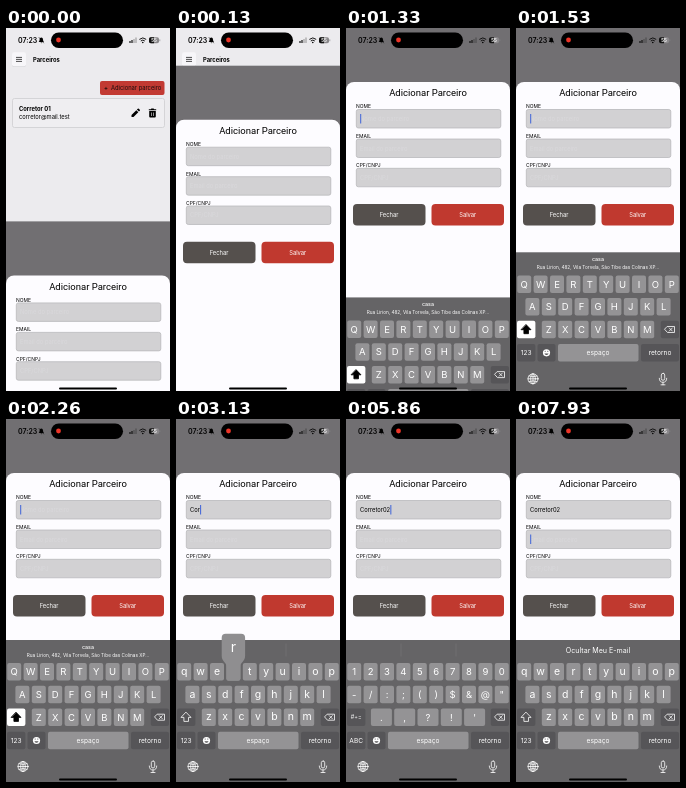
Write an HTML page that moves like this. It is 164 px wide and 363 px high and loops after 8000 ms.

```html
<!DOCTYPE html>
<html lang="pt-BR">
<head>
<meta charset="utf-8">
<title>Adicionar Parceiro</title>
<style>
  html, body { margin: 0; width: 100%; height: 100%; overflow: hidden; background: #ecebee; }
  svg { display: block; width: 100vw; height: 100vh; }
  text { font-family: Inter, Roboto, sans-serif; font-size: 5.8px; white-space: pre; }
  .mid { text-anchor: middle; }
  .bold { font-weight: 700; }
  .title { font-family: Roboto, sans-serif; font-size: 9.5px; }
  .label { font-size: 5px; }
  .hint { fill: #d9d8db; }
  .input { fill: #d2d1d3; stroke: #b4b3b6; stroke-width: .7; }
  .key { fill: #949395; }
  .dark { fill: #565558; }
  .line { fill: none; stroke: #fff; stroke-width: .8; stroke-linejoin: round; stroke-linecap: round; }
  #keyboard text { fill: #fff; }
</style>
</head>
<body>
<svg viewBox="0 0 164 363">
  <!-- partner list -->
  <rect width="164" height="363" fill="#ecebee"/>
  <rect x="6" y="25" width="14" height="14" rx="2" fill="#d9d8db"/>
  <rect x="6" y="24.3" width="14" height="14" rx="2" fill="#f7f6f9"/>
  <path d="M10 29.4h6M10 31.4h6M10 33.4h6" stroke="#222" stroke-width=".8"/>
  <text class="bold" x="27" y="33.6">Parceiros</text>
  <rect x="94" y="53" width="64.5" height="14" rx="2" fill="#c23a33"/>
  <text class="bold" x="98" y="62" fill="#1c0e0d">+</text>
  <text x="105" y="62" fill="#1c0e0d">Adicionar parceiro</text>
  <rect x="6.5" y="70.5" width="152" height="29" rx="2" fill="#efeef1" stroke="#cfced1" stroke-width=".8"/>
  <text class="bold" x="13" y="83.3">Corretor 01</text>
  <text x="13" y="91">corretor@mail.test</text>
  <path d="M125.5 89v-2l4.8-4.8 2 2-4.8 4.800zM130.900 81.600l.9-.9q.5-.5 1 0l1 1q.5.5 0 1l-.9.9z"/>
  <path d="M142.800 82.300v-1h2l.6-.7h2.200l.6.7h2v1zM143.200 83h6.600v5.500q0 1-1 1h-4.600q-1 0-1-1z"/>
  <path d="M145.500 84.500v3.500M147.500 84.500v3.500" stroke="#efeef1" stroke-width=".6"/>

  <!-- modal -->
  <g id="modal">
    <rect width="164" height="400" fill="#716f72"/>
    <rect y="54" width="164" height="360" rx="8" fill="#fdfcff"/>
    <text class="mid title" x="82" y="68.3">Adicionar Parceiro</text>
    <g id="fields"></g>
    <rect x="7" y="176" width="72.5" height="21.5" rx="4" fill="#55504d"/>
    <text class="mid" x="43" y="189" fill="#fff">Fechar</text>
    <rect x="85.5" y="176" width="72.5" height="21.5" rx="4" fill="#c0392f"/>
    <text class="mid" x="121.7" y="189" fill="#fff">Salvar</text>
    <text id="typed" x="14" y="93"></text>
    <rect id="caret" width="1" height="9.5" fill="#3f63d8"/>
  </g>

  <!-- status bar -->
  <text x="12" y="14.9" style="font-size:7px;font-weight:600">07:23</text>
  <path d="M32.6 14q1-.8 1-2.5 0-2 1.7-2t1.7 2q0 1.700 1 2.500zM34.500 14.600h1.700q-.8 1.200-1.700 0"/>
  <path d="M32.8 9.2l5 6" stroke="#000" stroke-width=".6"/>
  <rect x="45" y="4.5" width="72" height="15.5" rx="7.75"/>
  <circle cx="52.5" cy="12" r="2.4" fill="#ee3528"/>
  <path d="M124 15v-2M126 15v-3" stroke="#111" stroke-width="1.2"/>
  <path d="M128 15v-4M130 15v-5.5" stroke="#111" stroke-opacity=".35" stroke-width="1.2"/>
  <path d="M133.4 11.4q3.4-3 6.8 0M134.8 13q2-1.8 4 0" fill="none" stroke="#111"/>
  <circle cx="136.8" cy="14.5" r=".8"/>
  <rect x="143" y="9.3" width="10" height="6" rx="1.8" fill="#8a888b"/>
  <path d="M148 9.300h-3.200q-1.800 0-1.800 1.800v2.400q0 1.800 1.800 1.800h3.200z" fill="#111"/>
  <text class="mid bold" x="148" y="14" fill="#fff" style="font-size:4.6px">55</text>
  <path d="M153.8 11.4v1.8" stroke="#8a888b" stroke-width=".7"/>

  <!-- keyboard -->
  <g id="keyboard">
    <rect y="221" width="164" height="145" fill="#656466"/>
    <g id="address">
      <text class="mid" x="82" y="230" style="font-size:5.3px;font-weight:500">casa</text>
      <text class="mid" x="82" y="237.6" style="font-size:4.7px">Rua Lirion, 482, Vila Torvela, São Tibe das Colinas XP...</text>
    </g>
    <path id="dividers" d="M55 224.500v13M110 224.500v13" stroke="#77767a" stroke-width=".6"/>
    <text id="hideMail" class="mid" x="82" y="234.3" style="font-size:7.1px">Ocultar Meu E-mail</text>
    <g id="layouts"></g>
    <rect class="dark" x="21.5" y="312.7" width="18" height="17.5" rx="2"/>
    <circle cx="30.5" cy="321.5" r="3.6" fill="#fff"/>
    <path d="M28.4 322.2q2.100 3 4.200 0z" fill="#565558"/>
    <path d="M29.2 319.500v1.200M31.800 319.500v1.200" stroke="#565558" stroke-width=".8"/>
    <rect class="key" x="42" y="312.7" width="80.5" height="17.5" rx="2"/>
    <text class="mid" x="82" y="323.5" style="font-size:6.6px">espaço</text>
    <rect class="dark" x="125" y="312.7" width="38" height="17.5" rx="2"/>
    <text class="mid" x="144" y="323.5" style="font-size:6.6px">retorno</text>
    <rect class="dark" x="144.8" y="289.5" width="18.2" height="17.5" rx="2"/>
    <path class="line" d="M151.500 295.200h7v6h-7l-2.700-3zM153.300 296.700l3 3M156.300 296.700l-3 3"/>
    <g class="line">
      <circle cx="17" cy="347.5" r="5"/>
      <ellipse cx="17" cy="347.5" rx="2.3" ry="5"/>
      <path d="M12 347.500h10M17 342.500v10M13 344.700q4 1.600 8 0M13 350.300q4-1.600 8 0"/>
      <rect x="145.3" y="342" width="3.4" height="7" rx="1.7"/>
      <path d="M143.300 347q0 4 3.700 4t3.700-4M147 351v2.500M145 353.500h4"/>
    </g>
    <g id="popup">
      <path fill="#8f8e90"/>
      <text class="mid" y="-20" style="font-size:14px"></text>
    </g>
  </g>
  <rect x="53" y="359.5" width="58" height="2" rx="1"/>
</svg>
<script>
const $ = id => document.getElementById(id);
const show = (id, visible) => $(id).style.display = visible ? '' : 'none';

const LOOP = 8000, FPS = 15;
const FOCUS_NAME = 1000, KEYBOARD_IN = 1200, LOWERCASE = 2800, DIGITS = 4900;
const FOCUS_EMAIL = 6400, MAIL_TIP = 6730, EMAIL_LOWERCASE = 7660, POPUP_TIME = 120;
const STROKES = [
  [2600, 'C'], [2930, 'o'], [3100, 'r'], [3330, 'r'], [3500, 'e'],
  [3700, 't'], [3850, 'o'], [4000, 'r'], [5400, '0'], [5600, '2']
];
const PITCH = 16.4, ROW_Y = [252.8, 275.5, 298.2], BOTTOM_ROW_Y = 321.4;
const LETTERS = ['qwertyuiop', 'asdfghjkl', 'zxcvbnm'];
const LAYOUTS = {
  upper: LETTERS.map(row => row.toUpperCase()),
  lower: LETTERS,
  digits: ['1234567890', '-/:;()$&@"', ".,?!'"]
};
const keyPlaces = {};

$('fields').innerHTML = [
  ['NOME', 'Nome do parceiro', 81.5],
  ['EMAIL', 'Email do parceiro', 111],
  ['CPF/CNPJ', 'CPF/CNPJ', 140.3]
].map(([label, hint, y], i) => `
  <text class="label" x="10" y="${y - 1.1}">${label}</text>
  <rect class="input" x="10.3" y="${y}" width="144.5" height="18.5" rx="2"/>
  <text class="hint" id="hint${i}" x="14" y="${y + 11.5}">${hint}</text>`).join('');

function keyMarkup(x, y, width, label, size, dark) {
  const isLower = /^[a-z]$/.test(label);
  return `<rect class="${dark ? 'dark' : 'key'}" x="${x - width / 2}" y="${y - 8.7}" width="${width}" height="17.5" rx="2"/>
    <text class="mid" x="${x}" y="${y + size * (isLower ? .3 : .36)}" style="font-size:${size}px">${label}</text>`;
}

function layoutMarkup(name) {
  const isDigits = name === 'digits';
  const size = name === 'lower' ? 10.5 : 9.5;
  let out = '';
  LAYOUTS[name].forEach((row, r) => {
    const wide = isDigits && r === 2;
    const pitch = wide ? 23.3 : PITCH;
    [...row].forEach((char, i) => {
      const x = 82 + (i - (row.length - 1) / 2) * pitch;
      keyPlaces[char] = [x, ROW_Y[r]];
      out += keyMarkup(x, ROW_Y[r], wide ? 21 : 14, char, size);
    });
  });
  out += keyMarkup(10.2, BOTTOM_ROW_Y, 18.4, isDigits ? 'ABC' : '123', 6.6, true);
  if (isDigits) {
    out += keyMarkup(10.2, ROW_Y[2], 18.4, '#+=', 5.5, true);
  } else {
    const on = name === 'upper';
    out += `<rect x="1" y="289.5" width="18.4" height="17.5" rx="2" fill="${on ? '#fff' : '#565558'}"/>
      <path class="line" d="M10.2 293.4l4.8 5h-2.5v4h-4.6v-4h-2.5z" ${on ? 'style="fill:#000;stroke:#000"' : ''}/>`;
  }
  return `<g id="${name}">${out}</g>`;
}
$('layouts').innerHTML = Object.keys(LAYOUTS).map(layoutMarkup).join('');

// Remaining share of the way for a critically damped spring.
function spring(ms) {
  const x = Math.max(0, ms) * .017;
  return (1 + x) * Math.exp(-x);
}

function drawPopup(char) {
  show('popup', char);
  if (!char) return;
  const [x, y] = keyPlaces[char];
  const shift = Math.max(13, Math.min(151, x)) - x;
  const left = shift - 11.7, right = shift + 11.7;
  const [shape, letter] = $('popup').children;
  $('popup').setAttribute('transform', `translate(${x} ${y})`);
  shape.setAttribute('d', `M-7 7V-5C-7-10 ${left}-10 ${left}-16V-34q0-4 4-4H${right - 4}q4 0 4 4V-16C${right}-10 7-10 7-5V7q0 2-2 2H-5q-2 0-2-2z`);
  letter.setAttribute('x', shift);
  letter.textContent = char;
}

function layoutAt(t) {
  if (t < LOWERCASE) return 'upper';
  if (t < DIGITS) return 'lower';
  if (t < FOCUS_EMAIL) return 'digits';
  return t < EMAIL_LOWERCASE ? 'upper' : 'lower';
}

function draw(t) {
  const pressed = STROKES.filter(([at]) => at <= t);
  const last = pressed.at(-1);
  const inEmail = t >= FOCUS_EMAIL;

  $('modal').setAttribute('transform', `translate(0 ${363 * spring(t + 92.7)})`);
  const keyboardY = 143 * spring(t - KEYBOARD_IN);
  $('keyboard').setAttribute('transform', `translate(0 ${keyboardY})`);
  show('keyboard', t >= KEYBOARD_IN);

  $('typed').textContent = pressed.map(([, char]) => char).join('');
  show('hint0', !last);

  const caretStart = inEmail ? FOCUS_EMAIL : last ? last[0] : FOCUS_NAME;
  const textWidth = last && !inEmail ? $('typed').getComputedTextLength() : 0;
  $('caret').setAttribute('x', 14.2 + textWidth);
  $('caret').setAttribute('y', inEmail ? 115.5 : 86);
  show('caret', t >= FOCUS_NAME && (t - caretStart) % 1000 < 600);

  const current = layoutAt(t);
  for (const name in LAYOUTS) show(name, name === current);
  show('address', !last);
  show('dividers', last && !inEmail);
  show('hideMail', t >= MAIL_TIP);
  drawPopup(last && t - last[0] < POPUP_TIME ? last[1] : '');
}

function tick() {
  const frame = Math.floor((performance.now() % LOOP + 6.7) * FPS / 1000);
  draw(Math.min(frame, LOOP * FPS / 1000 - 1) * 1000 / FPS);
  requestAnimationFrame(tick);
}
tick();
</script>
</body>
</html>
```
